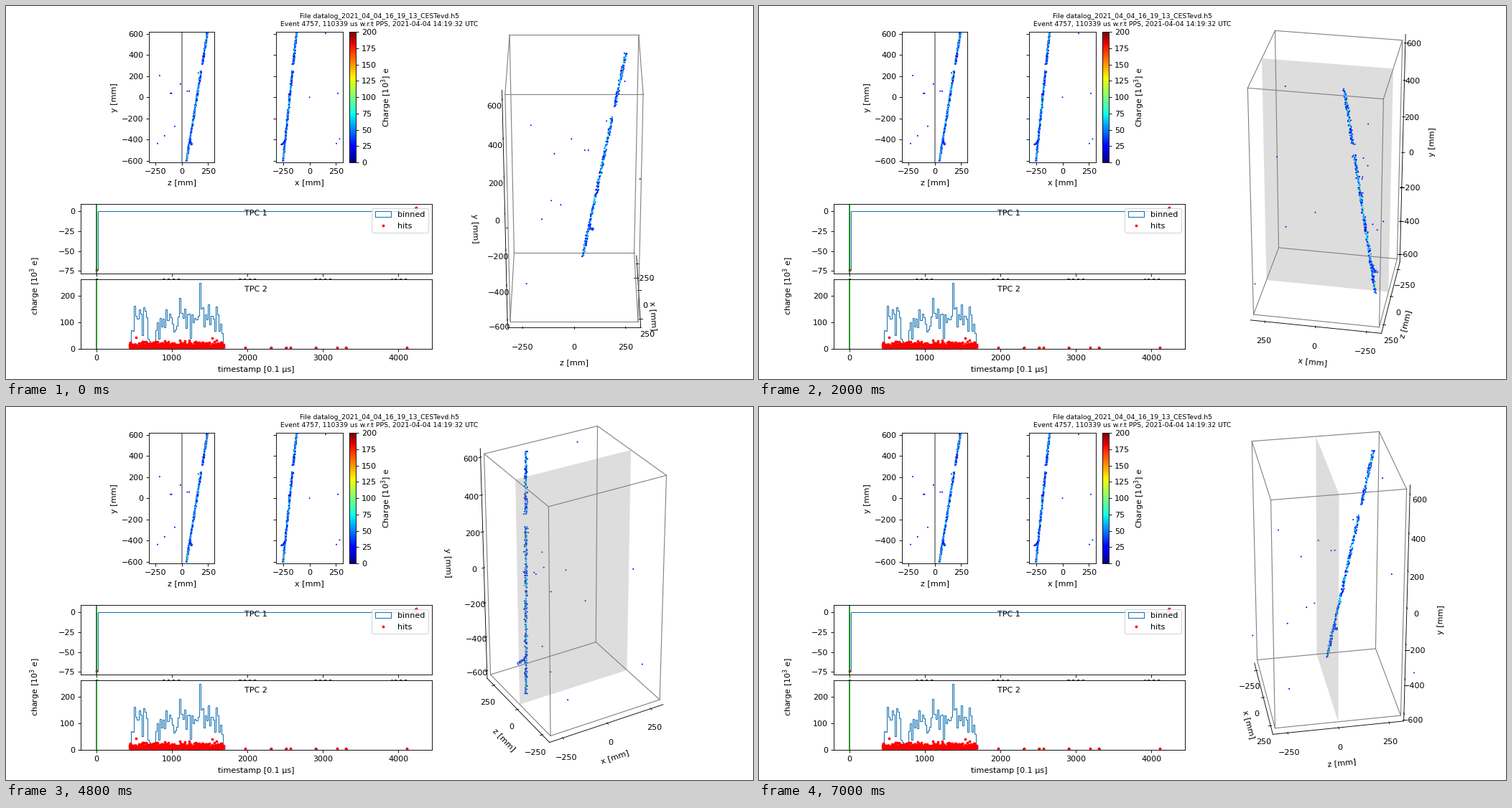
A matplotlib script for the animation above (7200 ms loop, 1040 px wide and 520 px high).

```python
import numpy as np
import matplotlib.pyplot as plt
from itertools import product
from matplotlib.animation import FuncAnimation
from mpl_toolkits.mplot3d.art3d import Poly3DCollection

W, H, DPI = 1040, 520, 80
FRAMES, INTERVAL = 36, 200
HALF, HEIGHT = 310, 620  # detector half sizes in mm
rng = np.random.default_rng(4)

plt.rcParams.update({"font.family": "DejaVu Sans", "font.size": 10})
fig = plt.figure(figsize=(W / DPI, H / DPI), dpi=DPI, facecolor="white")


def add_axes(left, top, right, bottom, **kw):
    """Axes placed by pixel edges measured from the top left."""
    return fig.add_axes([left / W, 1 - bottom / H, (right - left) / W, (bottom - top) / H], **kw)


def track_x(y):
    return -187 + 0.105 * y


def track_z(y):
    return 143 + 0.165 * y


def make_hits():
    """Return x, y, z and charge of every hit."""
    y = rng.uniform(-605, 618, 620)
    y = y[(y < 250) | (y > 312)]
    n = len(y)
    off_x, off_z = rng.normal(0, 3.2, (2, n))
    core = np.hypot(off_x, off_z) < 4.2
    q = np.where(core, rng.uniform(35, 80, n), rng.uniform(12, 45, n))
    q += 70 * (rng.random(n) < 0.05)
    track = np.array([track_x(y) + off_x, y, track_z(y) + off_z, q])

    s = np.linspace(0, 1, 32)
    branch = np.array([-233 - 33 * s ** 1.5, -405 - 42 * s ** 0.6, 78 + 18 * s, rng.uniform(20, 55, 32)])
    branch[:3] += rng.normal(0, 2.5, (3, 32))

    # Strays beside the track share its x; the others lie anywhere.
    beside = [(205, -210), (125, -13), (37, -97), (58, 52), (58, 70), (-275, -67),
              (-365, -163), (-421, -340), (230, 157), (235, 185)]
    apart = [(152, 604, 232), (0, 0, 318), (268, 37, -107), (254, -438, -230), (284, -395, 376)]
    stray = np.array([(track_x(v), v, w) for v, w in beside] + apart).T
    stray = np.vstack([stray, rng.uniform(20, 32, stray.shape[1])])
    return np.hstack([track, branch, stray])


x, y, z, charge = make_hits()
style = dict(c=charge, s=0.6, marker="o", cmap="jet", vmin=0, vmax=200)

fig.suptitle("File datalog_2021_04_04_16_19_13_CESTevd.h5\n"
             "Event 4757, 110339 us w.r.t PPS, 2021-04-04 14:19:32 UTC", fontsize="small")

# Side views
ax_zy = add_axes(199.2, 36.2, 290.3, 218.2)
ax_xy = add_axes(376.2, 36.2, 469, 218.2)
ax_bar = add_axes(478.2, 36.2, 487.3, 218.2)
ax_zy.axvline(0, color="gray")
for ax, across, half in ((ax_zy, z, 310), (ax_xy, x, 315)):
    points = ax.scatter(across, y, **style)
    ax.set(xlim=(-half, half), ylim=(-618, 618), xticks=(-250, 0, 250), yticks=range(-600, 601, 200))
ax_zy.set_ylabel("y [mm]")
ax_zy.set_xlabel("z [mm]", labelpad=5)
ax_xy.set_xlabel("x [mm]", labelpad=5)
ax_xy.tick_params(labelleft=False)
fig.colorbar(points, cax=ax_bar, label="Charge [$10^3$] e", ticks=range(0, 201, 25))

# Charge against time
STEP, START, STOP = 20, 440, 1700
edges = np.arange(0, 4260, STEP)
bin_t = np.arange(START, STOP, STEP) + STEP / 2
ramp = np.clip((bin_t - START) / 60, 0, 1) * np.clip((STOP - bin_t) / 80, 0, 1)
gap = 1 - 0.95 * np.exp(-((bin_t - 755) / 40) ** 2)
bin_q = np.clip(rng.normal(122, 36, len(bin_t)), 40, 195) * ramp * gap
bin_q[np.abs(bin_t - 1380).argmin()] = 250

late_t = [1970, 2310, 2515, 2570, 2900, 3185, 3305, 4110]
late_q = np.full(len(late_t), 6.5)
n = 640
hit_t = np.r_[rng.uniform(START, STOP - 10, n), late_t]
hit_q = np.r_[np.clip(3 + rng.gamma(2.2, 4, n), 4, 45), late_q]

pair = ([2, 4232], [-73.5, 5])
panels = (
    (add_axes(104.1, 276.2, 593.2, 372.7), pair, pair, (-78, 9), (-75, -50, -25, 0)),
    (add_axes(104.1, 381.1, 593.2, 478), (np.r_[bin_t, late_t], np.r_[bin_q, late_q]),
     (hit_t, hit_q), (0, 262.5), (0, 100, 200)),
)
for i, (ax, bins, hits, ylim, yticks) in enumerate(panels):
    ax.hist(bins[0], bins=edges, weights=bins[1], histtype="step", label="binned")
    ax.plot(*hits, "r.", ms=4.8, label="hits")
    ax.axvline(0, color="g")
    ax.set(xlim=(-205, 4447), ylim=ylim, xticks=range(0, 4001, 1000), yticks=yticks)
    ax.text(348 / W, 1 - (289.5 + 106 * i) / H, f"TPC {i + 1}", ha="center", va="center",
            transform=fig.transFigure)
panels[0][0].legend(loc="upper right")
panels[1][0].set_xlabel("timestamp [0.1 µs]", labelpad=6)
fig.text(41 / W, 1 - 390 / H, "charge [$10^3$ e]", rotation=90, ha="center", va="center")

# Rotating view, with the vertical axis showing y
ax3d = add_axes(563.5, 25.5, 1006.5, 468.5, projection="3d", facecolor="none")
ax3d.grid(False)
margin = 25 / 24
ax3d.set(xlim=(-HALF * margin, HALF * margin), ylim=(-HALF * margin, HALF * margin),
         zlim=(-HEIGHT * margin, HEIGHT * margin), xlabel="x [mm]", ylabel="z [mm]",
         xticks=(-250, 0, 250), yticks=(-250, 0, 250), zticks=range(-600, 601, 200))
ax3d.set_zlabel("y [mm]", labelpad=22)
ax3d.set_box_aspect((1, 1, 2))
for axis in (ax3d.xaxis, ax3d.yaxis, ax3d.zaxis):
    axis.set_pane_color((1, 1, 1, 0))

corners = np.array(list(product((-1, 1), repeat=3))) * (HALF, HALF, HEIGHT)
for a, b in product(corners, corners):
    if tuple(a) < tuple(b) and np.count_nonzero(a != b) == 1:
        ax3d.plot(*zip(a, b), color="gray", lw=1)
cathode = [(-HALF, 0, -HEIGHT), (HALF, 0, -HEIGHT), (HALF, 0, HEIGHT), (-HALF, 0, HEIGHT)]
ax3d.add_collection3d(Poly3DCollection([cathode], facecolors="gray", alpha=0.267))
ax3d.scatter(x, z, y, depthshade=False, **style)


def update(frame):
    ax3d.view_init(elev=30, azim=frame * 360 / FRAMES)
    return []


anim = FuncAnimation(fig, update, frames=FRAMES, interval=INTERVAL, repeat=True,
                     repeat_delay=0, init_func=lambda: update(0))
plt.show()
```
